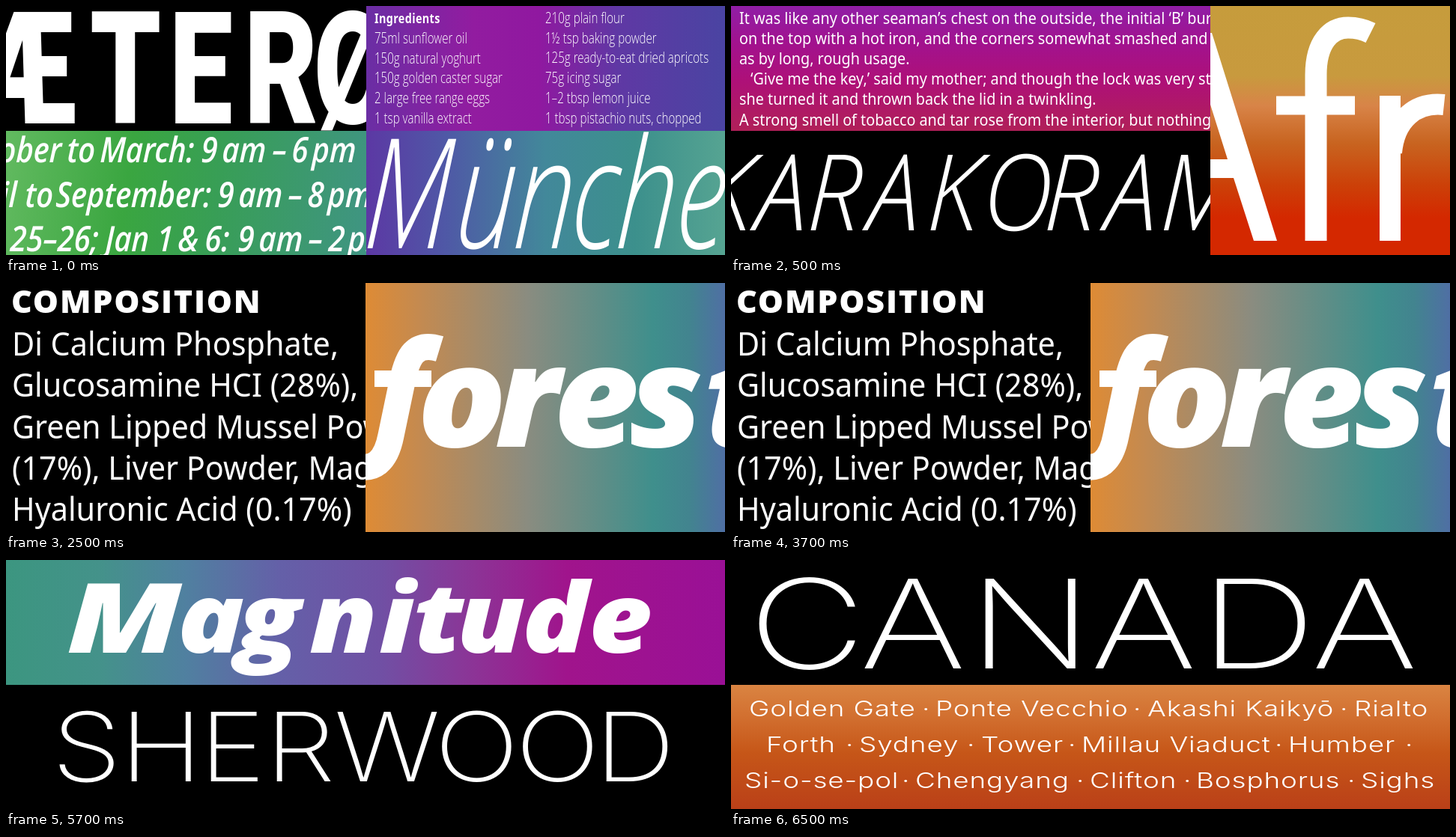
Animation, 960 px wide and 333 px high, one loop 8 s. Source, as an HTML page:

```html
<!DOCTYPE html>
<html lang="en">
<head>
<meta charset="utf-8">
<title>Type specimen</title>
<style>
  html, body { margin: 0; width: 100%; height: 100%; overflow: hidden; background: #000; }
  #stage { display: block; width: 100vw; height: 100vh; }
  text { fill: #fff; }
  .letter { fill: none; stroke: #fff; }
  .poster { font: 900 210px Roboto, sans-serif; }
  .recipe { font: 300 20px "Open Sans", sans-serif; }
  .recipe-head { font: 700 18.5px "Noto Sans", sans-serif; letter-spacing: .5px; }
  .hours { font: italic 600 47px "Open Sans", sans-serif; }
  .city { font: italic 300 205px "Open Sans", sans-serif; }
  .novel { font: 400 22px "Noto Sans", sans-serif; }
  .range { font: italic 300 141.5px "Open Sans", sans-serif; }
  .label { font: 400 44px "Noto Sans", sans-serif; }
  .label-head { font: 800 43px "Open Sans", sans-serif; letter-spacing: 1.8px; }
  .woods { font: italic 800 188px "Open Sans", sans-serif; }
  .force { font: italic 800 130px "Open Sans", sans-serif; }
  .thin { font: 200 128px Inter, sans-serif; }
  .land { font: 200 165px Inter, sans-serif; }
  .bridges { font: 300 29px Inter, sans-serif; letter-spacing: .7px; }
</style>
</head>
<body>
<svg id="stage" viewBox="0 0 960 333" preserveAspectRatio="none"></svg>
<script>
const LOOP = 8000;
const CUTS = [0, 500, 2500, 4500, 6500];
const BLACK = '#000';
const stage = document.getElementById('stage');
let gradients = '';

// Linear gradient between two points; stops look like "0 #abc, 1 #def".
function blend(id, [x1, y1, x2, y2], stops) {
  const marks = stops.split(', ').map(stop => {
    const [at, color] = stop.split(' ');
    return `<stop offset="${at}" stop-color="${color}"/>`;
  }).join('');
  gradients += `<linearGradient id="${id}" gradientUnits="userSpaceOnUse"
    x1="${x1}" y1="${y1}" x2="${x2}" y2="${y2}">${marks}</linearGradient>`;
  return `url(#${id})`;
}

// A clipped tile that keeps stage coordinates.
function panel(x, y, w, h, fill, content) {
  return `<svg x="${x}" y="${y}" width="${w}" height="${h}" viewBox="${x} ${y} ${w} ${h}">
    <rect x="${x}" y="${y}" width="${w}" height="${h}" fill="${fill}"/>${content}</svg>`;
}

// One baseline of text; pieces look like "12 word|80 word", the number being x.
function line(face, wide, y, pieces, slant = 0) {
  return pieces.split('|').map(piece => {
    const [, x, words] = piece.match(/^(-?\d+) (.*)$/);
    const place = `translate(${x} ${y}) skewX(${-slant}) scale(${wide} 1)`;
    return `<text class="${face}" transform="${place}">${words}</text>`;
  }).join('');
}

function lines(face, wide, y, step, rows, slant) {
  return rows.map((row, i) => line(face, wide, y + i * step, row, slant)).join('');
}

function letter(d, width) {
  return `<path class="letter" d="${d}" stroke-width="${width}"/>`;
}

function recipeScene() {
  const plum = blend('plum', [481, 0, 960, 0],
    '0 #6a2ea4, .3 #921ca0, .48 #9018a0, .7 #5f38a4, 1 #4a44a2');
  const leaf = blend('leaf', [0, 167, 481, 230],
    '0 #62ba60, .35 #3aa640, .6 #389e56, 1 #3f9580');
  const lagoon = blend('lagoon', [481, 167, 960, 167],
    '0 #5c38a4, .22 #4f58a6, .5 #42889a, .75 #3c908c, 1 #56a492');
  const recipe = line('recipe-head', .775, 23, '492 Ingredients') +
    lines('recipe', .755, 50, 26.7, [
      '492 75ml sunflower oil', '492 150g natural yoghurt', '492 150g golden caster sugar',
      '492 2 large free range eggs', '492 1 tsp vanilla extract'
    ]) +
    lines('recipe', .755, 23, 26.7, [
      '720 210g plain flour', '720 1½ tsp baking powder', '720 125g ready-to-eat dried apricots',
      '720 75g icing sugar', '720 1–2 tbsp lemon juice', '720 1 tbsp pistachio nuts, chopped'
    ]);
  const hours = lines('hours', .85, 209, 59.5, [
    '-10 ober|81 to|125 March:|260 9|288 am|355 –|381 6|408 pm',
    '-8 il|25 to|66 September:|282 9|310 am|376 –|402 8|429 pm',
    '5 25–26;|132 Jan|201 1|229 &amp;|265 6:|309 9|337 am|403 –|430 2|456 pm'
  ], 2);
  return panel(0, 0, 481, 167, BLACK,
      line('poster', .72, 157, '-45 Æ|112 T|218 E|318 R|410 Ø')) +
    panel(481, 0, 479, 167, plum, recipe) +
    panel(0, 167, 481, 166, leaf, hours) +
    panel(481, 167, 479, 166, lagoon,
      line('city', .7, 324, '475 M|598 ü|675 n|752 c|812 h|892 e', 4));
}

function novelScene() {
  const wine = blend('wine', [0, 0, 0, 167], '0 #901ea6, .3 #a2128e, .6 #ae1078, 1 #b02058');
  const ember = blend('ember', [0, 0, 0, 333],
    '0 #c69c3c, .28 #c89a3e, .4 #d88448, .55 #c86420, .72 #cc4008, .85 #d42800, 1 #d42800');
  const novel = lines('novel', .9, 23.5, 27.2, [
    '11 It was like any other seaman’s chest on the outside, the initial ‘B’ burned',
    '11 on the top with a hot iron, and the corners somewhat smashed and broken',
    '11 as by long, rough usage.',
    '26 ‘Give me the key,’ said my mother; and though the lock was very stiff,',
    '11 she turned it and thrown back the lid in a twinkling.',
    '11 A strong smell of tobacco and tar rose from the interior, but nothing was'
  ]);
  const afr = `<g role="img" aria-label="Afr">
    <path fill="#fff" d="M729 314H698L671 230H630V205H663L610 36H642Z"/>
    ${letter('M781 314V92C781 48 801 29 824 29Q840 29 854 36', 29)}
    ${letter('M728 133H833', 25)}
    ${letter('M880 314V120M882 196C886 152 914 128 952 132', 28)}</g>`;
  return panel(0, 0, 640, 167, wine, novel) +
    panel(0, 167, 640, 166, BLACK,
      line('range', .92, 300, '-43 K|32 A|100 R|182 A|260 K|334 O|416 R|499 A|571 M', 2)) +
    panel(640, 0, 320, 333, ember, afr);
}

function labelScene() {
  const dusk = blend('dusk', [480, 0, 960, 0],
    '0 #de8b35, .15 #c48a50, .45 #8a8c80, .8 #3f8f8c, .9 #42848f, 1 #4f6fa4');
  const label = line('label-head', 1, 40, '7 COMPOSITION') +
    lines('label', .94, 97, 55.3, [
      '8 Di Calcium Phosphate,', '8 Glucosamine HCI (28%),', '8 Green Lipped Mussel Powder',
      '8 (17%), Liver Powder, Magnesium', '8 Hyaluronic Acid (0.17%)'
    ]);
  const tallF = `<g role="img" aria-label="f">
    ${letter('M579 88C546 78 536 98 529 132L514 204C507 240 490 250 470 245', 35)}
    ${letter('M492 128H568', 22)}</g>`;
  return panel(0, 0, 480, 333, BLACK, label) +
    panel(480, 0, 480, 333, dusk,
      tallF + line('woods', 1.05, 219, '549 o|653 r|731 e|832 s|932 t'));
}

function forestScene() {
  const aurora = blend('aurora', [0, 0, 960, 0],
    '0 #3c9680, .13 #44928a, .25 #5080a0, .38 #6460a8, .52 #7050a4, .65 #8c3496, .78 #a0148c, 1 #9a1096');
  return panel(0, 0, 960, 167, aurora,
      line('force', 1.3, 124, '81 M') +
      line('force', 1.13, 124, '229 a|310 g|405 n|498 i|544 t|602 u|689 d|778 e')) +
    panel(0, 167, 960, 166, BLACK,
      line('thin', 1.17, 296, '61 S|152 H|258 E|346 R|438 W|572 O|680 O|786 D'));
}

function bridgeScene() {
  const clay = blend('clay', [0, 167, 0, 333], '0 #da8442, .25 #d27030, .55 #c65618, 1 #ba4018');
  const bridges = lines('bridges', 1.27, 209, 48, [
    '24 Golden Gate|255 ·|273 Ponte Vecchio|537 ·|556 Akashi Kaikyō|813 ·|832 Rialto',
    '47 Forth|153 ·|171 Sydney|315 ·|334 Tower|450 ·|468 Millau Viaduct|726 ·|744 Humber|900 ·',
    '18 Si-o-se-pol|228 ·|246 Chengyang|461 ·|479 Clifton|604 ·|621 Bosphorus|823 ·|841 Sighs'
  ]);
  return panel(0, 0, 960, 167, BLACK,
      line('land', 1.31, 145, '23 C|172 A|317 N|480 A|626 D|775 A')) +
    panel(0, 167, 960, 166, clay, bridges);
}

const scenes = [recipeScene, novelScene, labelScene, forestScene, bridgeScene]
  .map(build => `<g class="scene">${build()}</g>`).join('');
stage.innerHTML = `<defs>${gradients}</defs>${scenes}`;
const groups = [...stage.querySelectorAll('.scene')];

function draw(time) {
  const current = CUTS.filter(cut => cut <= time).length - 1;
  groups.forEach((group, i) => group.setAttribute('visibility', i === current ? 'visible' : 'hidden'));
}

function tick() {
  draw(performance.now() % LOOP);
  requestAnimationFrame(tick);
}
tick();
</script>
</body>
</html>
```
